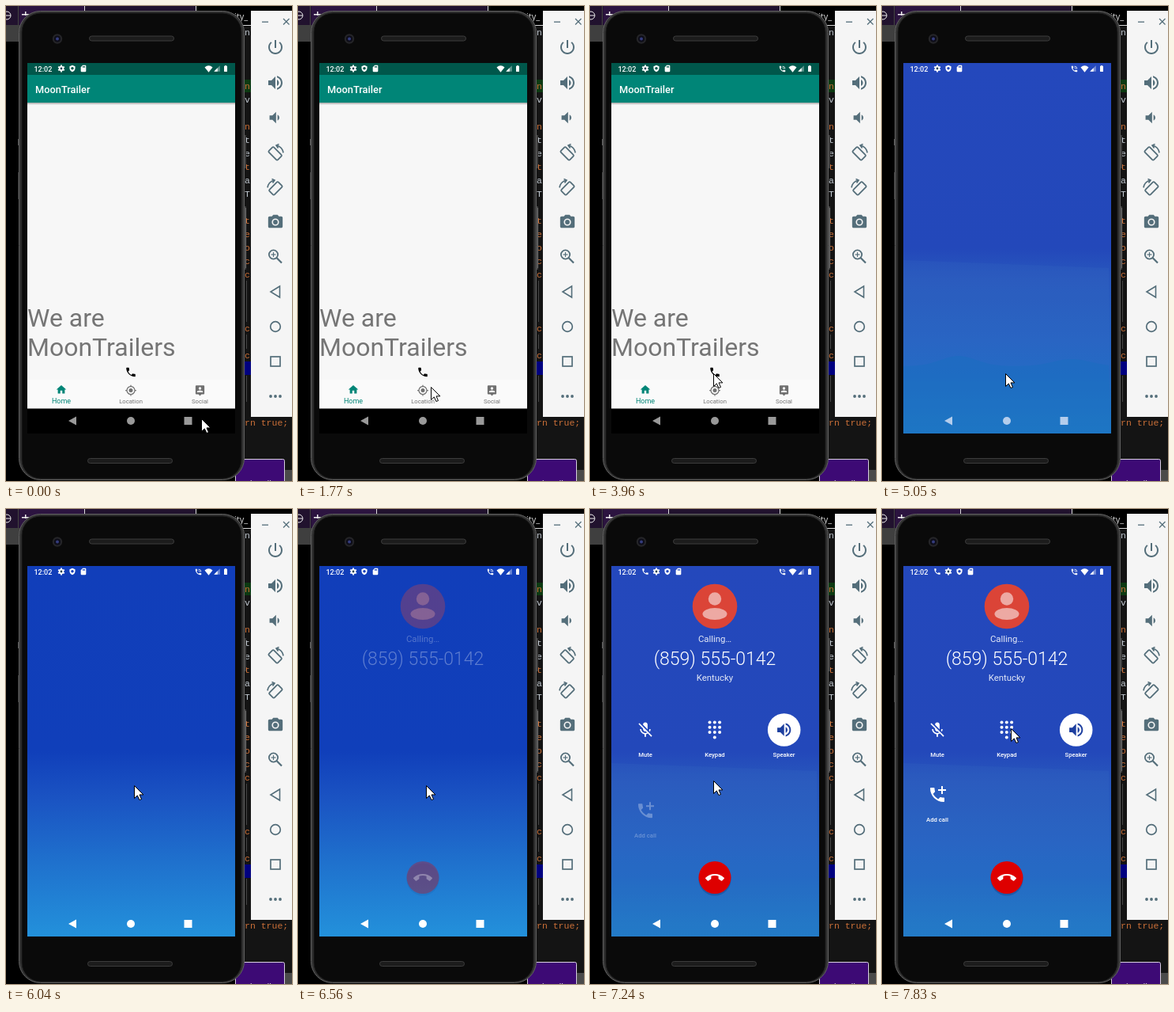
An HTML page with a canvas for the animation above (8 s loop, 362 by 600 pixels).

```html
<!DOCTYPE html>
<html lang="en">
<head>
<meta charset="utf-8">
<title>Phone call demo</title>
<style>
html, body { margin: 0; width: 100%; height: 100%; overflow: hidden; background: #000; }
canvas { display: block; width: 362px; height: 600px; }
</style>
</head>
<body>
<canvas id="stage"></canvas>
<script>
const W = 362, H = 600, LOOP = 8000;
const canvas = document.getElementById('stage');
const c = canvas.getContext('2d');
const dpr = window.devicePixelRatio || 1;
canvas.width = W * dpr;
canvas.height = H * dpr;

const SANS = 'Roboto, "Noto Sans", sans-serif';
const MONO = '"Liberation Mono", monospace';
const SLATE = '#546e7a', TEAL = '#008577', GREY = '#757575';

// Icons on a 24 unit grid
const paths = {
  power: 'M13 3h-2v10h2V3zm4.83 2.17l-1.42 1.42C17.99 7.86 19 9.81 19 12c0 3.87-3.13 7-7 7s-7-3.13-7-7c0-2.19 1.01-4.14 2.58-5.42L6.17 5.17C4.23 6.82 3 9.26 3 12c0 4.97 4.03 9 9 9s9-4.03 9-9c0-2.74-1.23-5.18-3.17-6.83z',
  volUp: 'M3 9v6h4l5 5V4L7 9H3zm13.5 3c0-1.77-1.02-3.29-2.5-4.03v8.05c1.48-.73 2.5-2.25 2.5-4.02zM14 3.23v2.06c2.89.86 5 3.54 5 6.71s-2.11 5.85-5 6.71v2.06c4.01-.91 7-4.49 7-8.77s-2.99-7.86-7-8.77z',
  volDown: 'M18.5 12c0-1.77-1.02-3.29-2.5-4.03v8.05c1.48-.73 2.5-2.25 2.5-4.02zM5 9v6h4l5 5V4L9 9H5z',
  camera: 'M9 2L7.17 4H4c-1.1 0-2 .9-2 2v12c0 1.1.9 2 2 2h16c1.1 0 2-.9 2-2V6c0-1.1-.9-2-2-2h-3.17L15 2zM12 7a5 5 0 1 1 0 10 5 5 0 0 1 0-10zM12 8.8a3.2 3.2 0 1 1 0 6.4 3.2 3.2 0 0 1 0-6.4z',
  home: 'M10 20v-6h4v6h5v-8h3L12 3 2 12h3v8z',
  gps: 'M12 8a4 4 0 1 0 0 8 4 4 0 0 0 0-8zm8.94 3c-.46-4.17-3.77-7.48-7.94-7.94V1h-2v2.06C6.83 3.52 3.52 6.83 3.06 11H1v2h2.06c.46 4.17 3.77 7.48 7.94 7.94V23h2v-2.06c4.17-.46 7.48-3.77 7.94-7.94H23v-2h-2.06zM12 19a7 7 0 1 1 0-14 7 7 0 0 1 0 14z',
  social: 'M19 2H5c-1.1 0-2 .9-2 2v14c0 1.1.9 2 2 2h4l3 3 3-3h4c1.1 0 2-.9 2-2V4c0-1.1-.9-2-2-2zM12 5.3a2.7 2.7 0 1 1 0 5.4 2.7 2.7 0 0 1 0-5.4zM18 16H6v-.9c0-2 4-3.1 6-3.1s6 1.1 6 3.1z',
  call: 'M6.62 10.79c1.44 2.83 3.76 5.14 6.59 6.59l2.2-2.2c.27-.27.67-.36 1.02-.24 1.12.37 2.33.57 3.57.57.55 0 1 .45 1 1V20c0 .55-.45 1-1 1-9.39 0-17-7.61-17-17 0-.55.45-1 1-1h3.5c.55 0 1 .45 1 1 0 1.25.2 2.45.57 3.57.11.35.03.74-.25 1.02z',
  plus: 'M16 2h2v4h4v2h-4v4h-2V8h-4V6h4z',
  waves: 'M19 12h2c0-5-4-9-9-9v2c3.9 0 7 3.1 7 7zM15 12h2c0-2.8-2.2-5-5-5v2c1.7 0 3 1.3 3 3z',
  hangUp: 'M12 9c-1.6 0-3.15.25-4.6.72v3.1c0 .39-.23.74-.56.9-.98.49-1.87 1.12-2.66 1.85-.18.18-.43.28-.7.28-.28 0-.53-.11-.71-.29L.29 13.08a1 1 0 0 1 0-1.41C3.34 8.78 7.46 7 12 7s8.66 1.78 11.71 4.67a1 1 0 0 1 0 1.42l-2.48 2.48c-.18.18-.43.29-.71.29-.27 0-.52-.11-.7-.28-.79-.74-1.69-1.36-2.67-1.85-.33-.16-.56-.5-.56-.9v-3.1C15.15 9.25 13.6 9 12 9z',
  micOff: 'M19 11h-1.7c0 .74-.16 1.43-.43 2.05l1.23 1.23c.56-.98.9-2.09.9-3.28zm-4.02.17L15 11V5c0-1.66-1.34-3-3-3S9 3.34 9 5v.18zM4.27 3L3 4.27l6.01 6.01V11c0 1.66 1.33 3 2.99 3l.65-.08 1.66 1.66c-.71.33-1.5.52-2.31.52-2.76 0-5.3-2.1-5.3-5.1H5c0 3.41 2.72 6.23 6 6.72V21h2v-3.28c.91-.13 1.77-.45 2.54-.9L19.73 21 21 19.73z',
  shield: 'M12 1L3 5v6c0 5.5 3.8 10.7 9 12 5.2-1.3 9-6.5 9-12V5zM12 7a4 4 0 1 1 0 9 4 4 0 0 1 0-9z',
  sd: 'M18 2h-8L4 8v12c0 1.1.9 2 2 2h12c1.1 0 2-.9 2-2V4c0-1.1-.9-2-2-2zM9 5h2v4H9zM12 5h2v4h-2zM15 5h2v4h-2z',
  wifi: 'M0 7Q12-3 24 7L12 22z',
  signal: 'M22 2v20H2z',
  signalLow: 'M14 10v12H2z',
  battery: 'M16 4h-2V2h-4v2H8c-.6 0-1 .4-1 1v16c0 .6.4 1 1 1h8c.6 0 1-.4 1-1V5c0-.6-.4-1-1-1z',
  arrow: 'M0 0V16L3.8 12.4 6.4 18 9 17 6.5 11.4H11.4z'
};
const shapes = {};
for (const k in paths) shapes[k] = new Path2D(paths[k]);

function rect(x, y, w, h, fill) { c.fillStyle = fill; c.fillRect(x, y, w, h); }

function pill(x, y, w, h, r, fill, stroke) {
  c.beginPath();
  c.roundRect(x, y, w, h, r);
  if (fill) { c.fillStyle = fill; c.fill(); }
  if (stroke) { c.strokeStyle = stroke; c.stroke(); }
}

function oval(x, y, rx, ry, fill) {
  c.beginPath();
  c.ellipse(x, y, rx, ry, 0, 0, 7);
  c.fillStyle = fill;
  c.fill();
}

function line(points, stroke, width = 1) {
  c.beginPath();
  points.forEach(([x, y]) => c.lineTo(x, y));
  c.strokeStyle = stroke;
  c.lineWidth = width;
  c.stroke();
  c.lineWidth = 1;
}

function icon(name, x, y, size, fill) {
  c.save();
  c.translate(x - size / 2, y - size / 2);
  c.scale(size / 24, size / 24);
  c.fillStyle = fill;
  c.fill(shapes[name], 'evenodd');
  c.restore();
}

function text(s, x, y, size, fill, align = 'left', weight = 400, family = SANS) {
  c.font = `${weight} ${size}px ${family}`;
  c.textAlign = align;
  c.fillStyle = fill;
  c.fillText(s, x, y);
}

function faded(alpha, draw) {
  c.save();
  c.globalAlpha = alpha;
  draw();
  c.restore();
}

function gradient(y0, y1, stops) {
  const g = c.createLinearGradient(0, y0, 0, y1);
  stops.forEach(([p, color]) => g.addColorStop(p, color));
  return g;
}

function desktop() {
  rect(0, 0, W, H, '#000');
  rect(0, 0, 241, 24, '#21122e');
  rect(17, 0, 82, 24, '#2c1440');
  rect(0, 24, 18, 21, '#3f3f3f');
  rect(99, 0, 1, 7, '#ddd');
  rect(240, 0, 1, 7, '#ddd');
  rect(15, 0, 1, 24, '#444');
  c.strokeStyle = '#eee';
  c.beginPath(); c.arc(1, 12, 5, 0, 7); c.stroke();
  line([[-4, 12], [6, 12]], '#eee');
  rect(20, 10, 9, 1.5, '#eee');
  rect(24, 7, 1.5, 5, '#eee');
  text('ity_', 289, 17, 11, '#ddd', 'left', 400, '"Open Sans", sans-serif');
  rect(241, 24, 69, 1, '#ddd');

  rect(300, 26, 62, 574, '#141414');
  rect(300, 93, 10, 16, '#0d3a12');
  rect(300, 449, 10, 17, '#000080');
  const pale = '#c3cad2', rust = '#cc7038';
  [['n', 37, pale], ['n', 105, rust], ['v', 122, pale], ['n', 156, rust], ['t', 173, pale],
   ['e', 190, pale], ['t', 207, rust], ['a', 224, pale], ['T', 241, pale], ['t', 275, rust],
   ['e', 292, rust], ['o', 309, rust], ['c', 326, rust], ['c', 343, rust], ['c', 411, rust],
   ['c', 445, rust], ['rn true;', 530, rust]]
    .forEach(([s, y, col]) => text(s, 302, y, 11.5, col, 'left', 400, MONO));
  rect(304, 347, 1, 52, '#444');
  rect(304, 415, 1, 18, '#444');
  rect(304, 467, 1, 33, '#444');
  rect(353, 586, 9, 14, '#4a4a4a');
  pill(290.5, 572.5, 62, 40, 2, '#3d0a75', '#d8d0e0');
  text('handle', 309, 607, 11, '#ddd');
}

function toolbar() {
  rect(310, 6, 52, 513, '#f5f5f5');
  rect(324, 19.5, 8, 1.3, SLATE);
  line([[351, 16], [358.5, 23.5]], SLATE, 1.3);
  line([[358.5, 16], [351, 23.5]], SLATE, 1.3);
  icon('power', 341, 52, 24, SLATE);
  icon('volUp', 341, 97, 24, SLATE);
  icon('volDown', 340, 141, 22, SLATE);
  turn(341, 186, 1);
  turn(341, 230, -1);
  icon('camera', 341, 273, 22, SLATE);
  c.lineWidth = 1.8;
  c.strokeStyle = SLATE;
  c.beginPath(); c.arc(338.5, 314, 5.6, 0, 7); c.stroke();
  line([[342.5, 318], [349, 324.5]], SLATE, 2.2);
  line([[335.5, 314], [341.5, 314]], SLATE, 1.2);
  line([[338.5, 311], [338.5, 317]], SLATE, 1.2);
  line([[346.5, 354], [346.5, 368], [335, 361], [346.5, 354], [346.5, 358]], SLATE, 1.6);
  c.lineWidth = 1.7;
  c.beginPath(); c.arc(341, 405, 6.3, 0, 7); c.stroke();
  c.strokeRect(335, 443, 12, 12);
  c.lineWidth = 1;
  [335, 341, 347].forEach(x => oval(x, 493, 1.9, 1.9, SLATE));
}

function turn(x, y, dir) {
  c.save();
  c.translate(x, y);
  c.scale(dir, 1);
  c.lineWidth = 1.8;
  c.strokeStyle = SLATE;
  c.beginPath(); c.arc(-0.5, 0.5, 10.5, -1.35, -0.1); c.stroke();
  line([[4.5, -11.5], [1, -10], [3.5, -6.5]], SLATE, 1.6);
  c.rotate(Math.PI / 4);
  c.lineWidth = 1.8;
  pill(-8, -4, 16, 9, 1.5, null, SLATE);
  c.restore();
}

function phone() {
  rect(15, 168, 4, 8, '#555');
  rect(15, 210, 3, 34, '#333');
  rect(300, 163, 4, 42, '#3c3c3c');
  rect(300, 253, 4, 80, '#3c3c3c');
  rect(303, 255, 1, 76, '#777');
  c.lineWidth = 1;
  pill(16.5, 6.5, 285, 592, 27, '#343434', '#606060');
  pill(20, 9, 278, 588, 24, '#0a0a0a', '#1d1d1d');
  pill(105.5, 38, 107, 6, 3, '#1c1c1c', '#3c3c3c');
  pill(103.5, 571.5, 107, 6, 3, '#1c1c1c', '#3c3c3c');
  oval(65, 41.5, 6.2, 6.2, '#252528');
  oval(65, 41.5, 4, 4, '#0d0d18');
  oval(65, 41.5, 2, 2, '#343c7c');
}

function gear(x, y) {
  oval(x, y, 3.2, 3.2, '#fff');
  for (let i = 0; i < 3; i++) {
    const a = i * Math.PI / 3 + Math.PI / 6, dx = 4.4 * Math.cos(a), dy = 4.4 * Math.sin(a);
    line([[x - dx, y - dy], [x + dx, y + dy]], '#fff', 2);
  }
  oval(x, y, 1.4, 1.4, '#245');
}

function statusBar(t) {
  text('12:02', 35.5, 82.6, 9, '#fff', 'left', 500);
  const shift = t >= 7000 ? 14 : 0;
  if (shift) icon('call', 70, 79, 10, '#fff');
  gear(70 + shift, 79);
  icon('shield', 84 + shift, 79, 9.5, '#fff');
  icon('sd', 98 + shift, 79, 10, '#fff');
  if (t >= 3960) {
    icon('call', 243.5, 79.5, 10, '#fff');
    icon('waves', 243.5, 79.5, 10, '#fff');
  }
  icon('wifi', 256.5, 79.5, 10, '#fff');
  faded(0.4, () => icon('signal', 267, 79, 9, '#fff'));
  icon('signalLow', 267, 79, 9, '#fff');
  icon('battery', 278, 79, 9.5, '#fff');
}

function navKeys(fill) {
  c.beginPath();
  c.moveTo(79, 524); c.lineTo(89, 518.5); c.lineTo(89, 529.5);
  c.fillStyle = fill;
  c.fill();
  oval(158, 524, 5, 5, fill);
  rect(225.5, 519, 10, 10, fill);
}

function app() {
  rect(27, 72, 263, 15.5, '#00574b');
  rect(27, 87, 263, 35, TEAL);
  rect(27, 122, 263, 387, '#f7f7f7');
  rect(27, 122, 263, 3, gradient(122, 125, [[0, 'rgba(0,0,0,.35)'], [1, 'rgba(0,0,0,0)']]));
  text('MoonTrailer', 37, 109.5, 12.8, '#fff', 'left', 500);
  text('We are', 27, 404.5, 32, GREY);
  text('MoonTrailers', 27, 442, 32, GREY);
  icon('call', 158, 462.5, 15.4, '#000');
  rect(27, 472, 263, 36.5, '#fafafa');
  icon('home', 70, 484.5, 15, TEAL);
  icon('gps', 158, 485.5, 15, '#707070');
  icon('social', 245.5, 485.5, 15, '#707070');
  text('Home', 70, 502, 9, TEAL, 'center');
  text('Location', 158, 502, 7.7, GREY, 'center');
  text('Social', 245.5, 502, 7.7, GREY, 'center');
  rect(27, 508.5, 263, 31.5, '#000');
  navKeys('#999');
}

function band(y, bend, fill) {
  c.beginPath();
  c.moveTo(27, 540);
  for (let x = 27; x <= 290; x += 4) c.lineTo(x, y + bend(x));
  c.lineTo(290, 540);
  c.fillStyle = fill;
  c.fill();
}

function softSky(hills) {
  rect(27, 72, 263, 468, gradient(72, 540, [[0, '#2448bc'], [0.5, '#2348ba'], [0.58, '#2857bd'],
    [0.75, '#2663c3'], [0.84, '#2169c4'], [1, '#1f7dc8']]));
  band(321, x => (x - 27) / 26, 'rgba(55,110,195,.16)');
  if (hills) band(455, x => -13 * Math.exp(-(((x - 97) / 32) ** 2)) - 9 * Math.exp(-(((x - 240) / 34) ** 2)), 'rgba(20,110,190,.4)');
}

function clearSky() {
  rect(27, 72, 263, 468, gradient(72, 540, [[0, '#113eba'], [0.5, '#103fba'], [0.62, '#1a52c2'],
    [0.8, '#1f71cd'], [1, '#2391db']]));
}

function caller() {
  oval(158, 123, 28.3, 28.3, '#db4437');
  oval(158, 113.5, 8.2, 8.2, '#eda9a3');
  oval(158, 132.5, 15.5, 7.5, '#eda9a3');
  text('Calling…', 158, 168, 11.4, '#e4e9f7', 'center');
  text('(859) 555-0142', 158, 196.5, 23, '#fff', 'center', 300);
  oval(158, 468, 20.5, 20.5, 'rgba(0,20,80,.22)');
  oval(158, 465.5, 20.5, 20.5, '#de0000');
  icon('hangUp', 158, 466, 24, '#fff');
}

function label(s, x, y) { text(s, x, y, 7.7, '#fff', 'center', 500); }

function topButtons(dy) {
  icon('micOff', 70, 279 + dy, 23, '#fff');
  for (let i = 0; i < 9; i++)
    oval(151.5 + (i % 3) * 6.3, 269.5 + dy + Math.floor(i / 3) * 6.3, 2, 2, '#fff');
  oval(157.8, 288.4 + dy, 2, 2, '#fff');
  oval(245.7, 279 + dy, 20.8, 20.8, '#fff');
  icon('volUp', 245.7, 279 + dy, 23, '#1d3f9f');
  label('Mute', 70, 313 + dy);
  label('Keypad', 158, 313 + dy);
  label('Speaker', 245.5, 313 + dy);
}

function addCall(dy) {
  icon('call', 70, 361 + dy, 24, '#fff');
  icon('plus', 71, 360 + dy, 24, '#fff');
  label('Add call', 70, 395 + dy);
}

function callScreen(t) {
  const fading = t >= 6560 && t < 6710;
  if (t < 5180) softSky(true);
  else if (t < 6710) clearSky();
  else softSky(false);
  if (t >= 6560) faded(fading ? 0.32 : 1, caller);
  if (t >= 7000) {
    text('Kentucky', 158, 217, 11.4, '#e4e9f7', 'center');
    const rise = t < 7120 ? 0.4 : t < 7240 ? 0.8 : 1;
    faded(rise, () => topButtons(20 * (1 - rise)));
  }
  if (t >= 7240) {
    const rise = t < 7390 ? 0.3 : t < 7520 ? 0.75 : 1;
    faded(rise, () => addCall(29 * (1 - rise)));
  }
  navKeys(t < 5320 ? '#b4cdec' : '#fff');
}

// Pointer stops: time, x, y
const stops = [[0, 247, 521], [370], [1770, 168, 481], [1890, 149, 474], [2040, 145, 475],
  [2290, 148, 473], [2410, 153, 467], [2530, 156, 464], [5910, 159, 395], [6040, 162, 349],
  [7120, 159, 347], [7240, 156, 343], [7390, 152, 322], [7520, 150, 307], [7670, 157, 298],
  [7830, 163, 277]];

function pointer(t) {
  const [, x, y] = stops.filter(s => s[0] <= t).pop();
  if (x === undefined) return;
  c.save();
  c.translate(x + 0.5, y + 0.5);
  c.fillStyle = '#fff';
  c.strokeStyle = '#000';
  c.fill(shapes.arrow);
  c.stroke(shapes.arrow);
  c.restore();
}

const start = performance.now();

function render() {
  const t = (performance.now() - start) % LOOP;
  c.setTransform(dpr, 0, 0, dpr, 0, 0);
  c.lineWidth = 1;
  desktop();
  phone();
  toolbar();
  if (t < 5050) app();
  else callScreen(t);
  statusBar(t);
  pointer(t);
  requestAnimationFrame(render);
}
render();
</script>
</body>
</html>
```
